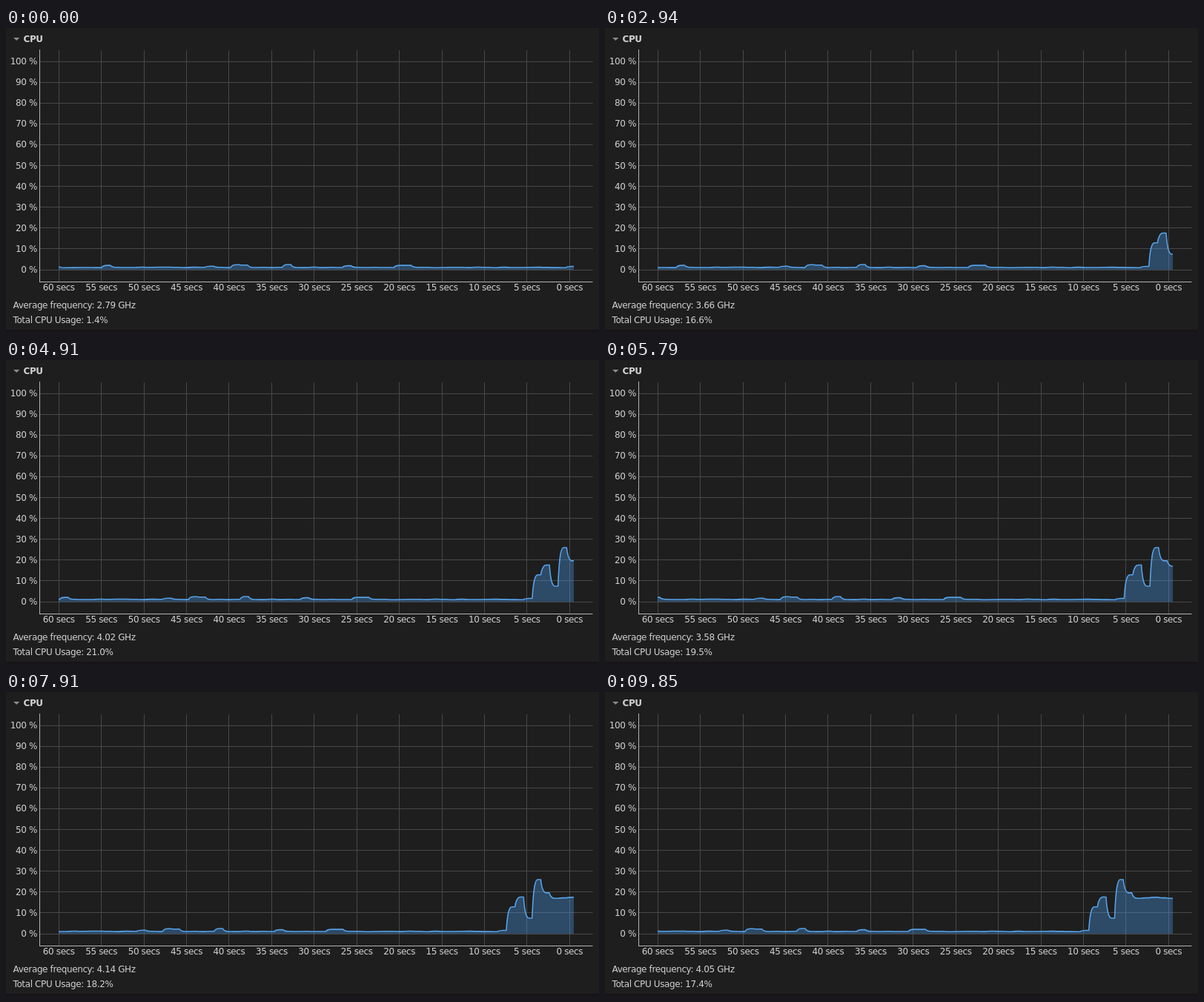
An HTML page for the animation above (10000 ms loop, 800 by 410 pixels).

```html
<!DOCTYPE html>
<html lang="en">
<head>
<meta charset="utf-8">
<title>CPU usage</title>
<style>
  html, body { margin: 0; width: 100%; height: 100%; overflow: hidden; background: #1e1e1e; }
  svg { display: block; width: 800px; height: 410px; }
  text { font: 12px "DejaVu Sans", sans-serif; letter-spacing: -.38px; fill: #d0d0d0; white-space: pre; }
  .title { font-weight: bold; }
  .grid { stroke: #484848; }
  .axis { fill: none; stroke: #b4b4b4; }
  #area { fill: #4a9ae6; fill-opacity: .36; }
  #line { fill: none; stroke: #56a0e6; stroke-width: 1.6; stroke-linejoin: round; }
</style>
</head>
<body>
<svg viewBox="0 0 800 410">
  <defs><clipPath id="plot"><rect x="71" y="30" width="695" height="312"/></clipPath></defs>
  <rect width="800" height="410" fill="#1e1e1e"/>
  <rect y="407" width="800" height="3" fill="#181418"/>
  <path d="M10 13h8.4l-4.2 4z" fill="#8c8c8c"/>
  <text class="title" x="23.5" y="19">CPU</text>
  <g id="scale"></g>
  <g clip-path="url(#plot)">
    <g id="wave"><path id="area"/><path id="line"/></g>
  </g>
  <path class="axis" d="M45.5 29V343M45 342.5H791.5"/>
  <text id="freq" x="9.5" y="378"></text>
  <text id="usage" x="9.5" y="398"></text>
</svg>
<script>
const LOOP = 10000, TICK = 137, FIRST_TICK = 90;
const SAMPLE = 11.6, START = 71, ZERO = 326, IDLE_SECONDS = 60;
const get = id => document.getElementById(id);
const yOf = percent => ZERO - percent * 2.81;

// Small bumps in the quiet minute, keyed by seconds before the load starts.
const bumps = { 55: 2.1, 43: 1.7, 40: 2.4, 39: 2.2, 34: 2.5, 27: 1.9, 21: 2.1, 20: 2.1, 1: 1.6 };
const busy = [12.9, 17.6, 7.5, 26, 19.6, 17, 17.2, 17.5, 17.2, 17];

// Readout key points: [second, GHz, percent].
const readouts = [
  [0, 2.79, 1.4], [2, 3.48, 14.4], [5, 4.02, 21], [6, 3.58, 19.5],
  [7, 3.98, 18.6], [9, 4.3, 17.8], [10, 4.05, 17.4]
];

function seeded(seed) {
  return () => (seed = (seed * 16807) % 2147483647) / 2147483647;
}

function samples() {
  const random = seeded(77);
  const idle = Array.from({ length: IDLE_SECONDS }, (_, i) => {
    const hum = 1 + random() * .25;
    return bumps[IDLE_SECONDS - i] || hum;
  });
  return idle.concat(busy);
}

function buildScale() {
  let out = '';
  const label = (x, y, anchor, text) =>
    out += `<text x="${x}" y="${y}" text-anchor="${anchor}">${text}</text>`;
  for (let i = 0; i <= 10; i++) {
    const y = yOf(i * 10);
    out += `<path class="grid" d="M46 ${Math.floor(y + .05) + .5}H791.5"/>`;
    label(42, Math.round(y) + 4, 'end', `${i * 10} %`);
  }
  for (let i = 0; i <= 12; i++) {
    const x = 71.3 + i * 57.42;
    out += `<path class="grid" d="M${Math.floor(x) + .5} 30V342"/>`;
    label(x, 354, 'middle', `${60 - i * 5} secs`);
  }
  get('scale').innerHTML = out;
}

// Each second eases quickly to its value, then holds it.
function buildWave() {
  const values = samples();
  let from = yOf(1.6), d = `M${START - 2} ${from}H${START}`;
  values.forEach((value, i) => {
    const x = START + i * SAMPLE, to = yOf(value);
    d += `C${x + 1.2} ${from + (to - from) * .6} ${x + 3} ${to} ${x + 7.5} ${to}H${x + SAMPLE}`;
    from = to;
  });
  get('line').setAttribute('d', d);
  get('area').setAttribute('d', `${d}V${ZERO}H${START - 2}Z`);
}

// Time of the latest redraw, taken a little into its tick.
function tickTime(t) {
  const tick = Math.floor((t - FIRST_TICK) / TICK);
  return Math.max(0, FIRST_TICK + tick * TICK + TICK / 4);
}

function readout(second) {
  const next = Math.max(1, readouts.findIndex(key => key[0] >= second));
  const a = readouts[next - 1], b = readouts[next];
  const mix = (second - a[0]) / (b[0] - a[0]);
  return a.map((value, i) => value + (b[i] - value) * mix);
}

function draw(elapsed) {
  const t = elapsed % LOOP;
  const [, ghz, percent] = readout(Math.floor((t + 950) / 1000));
  get('wave').setAttribute('transform', `translate(${-tickTime(t) / 1000 * SAMPLE} 0)`);
  get('freq').textContent = `Average frequency: ${ghz.toFixed(2)} GHz`;
  get('usage').textContent = `Total CPU Usage: ${percent.toFixed(1)}%`;
}

buildScale();
buildWave();
const begin = performance.now();
function loop() {
  draw(performance.now() - begin);
  requestAnimationFrame(loop);
}
loop();
</script>
</body>
</html>
```
